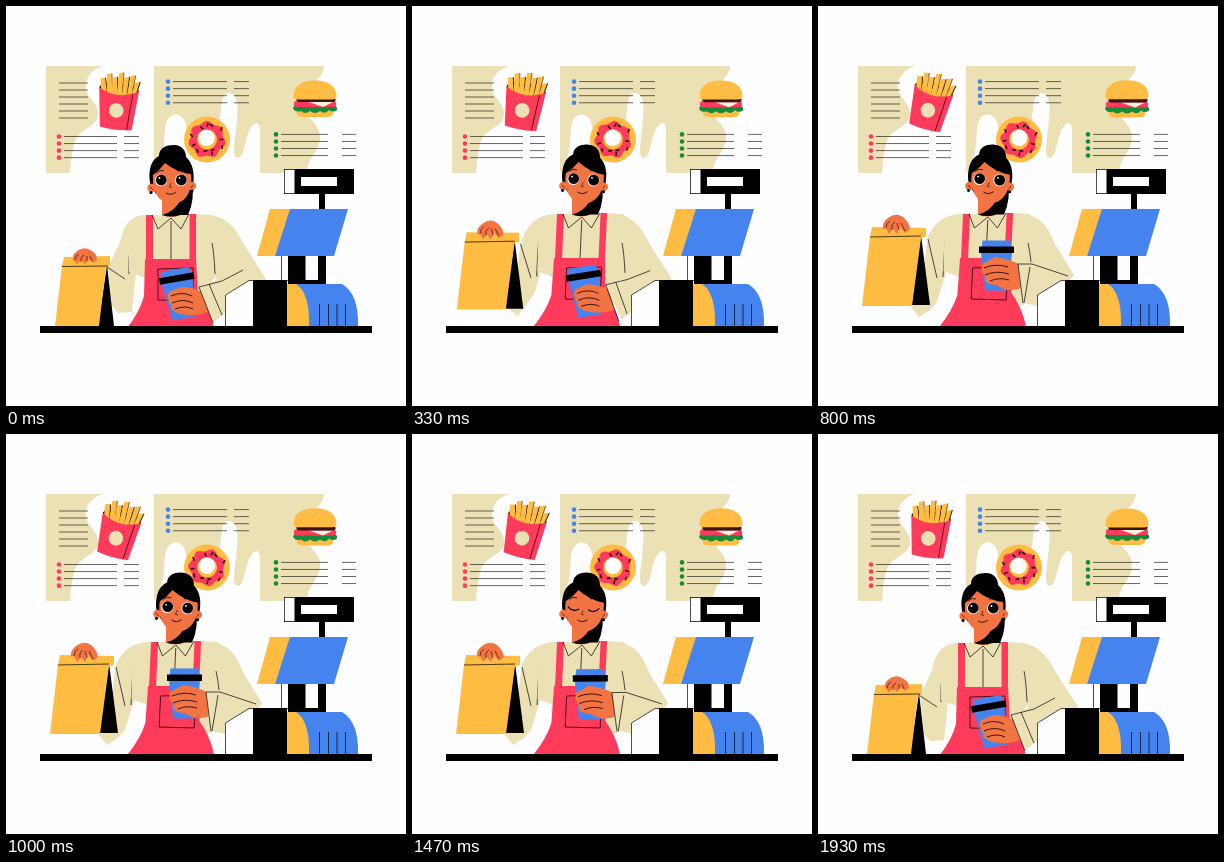
Write an HTML page with a canvas that moves like this. It is 400 px wide and 400 px high and loops after 2 s.

```html
<!DOCTYPE html>
<html>
<head>
<meta charset="utf-8">
<style>
html, body { margin: 0; width: 100%; height: 100%; overflow: hidden; background: #fefdff; }
canvas { display: block; width: 400px; height: 400px; }
</style>
</head>
<body>
<canvas id="stage"></canvas>
<script>
const canvas = document.getElementById('stage');
const ctx = canvas.getContext('2d');
const dpr = window.devicePixelRatio || 1;
canvas.width = canvas.height = 400 * dpr;

const LOOP = 2000;
const BLACK = '#000', WHITE = '#fefdff', BEIGE = '#ece1b5', YELLOW = '#ffbc43', PINK = '#ff3b5c',
  BLUE = '#4583ee', SKIN = '#f37443', GREEN = '#178a3a', CREASE = '#3a1410';

const ramp = (t, a, b) => {
  const x = Math.min(1, Math.max(0, (t - a) / (b - a)));
  return x * x * (3 - 2 * x);
};
const hold = (t, a, b, c, d) => ramp(t, a, b) - ramp(t, c, d);
const mix = (a, b, k) => a + (b - a) * k;

// Blends two path strings that share the same commands.
function morph(from, to, k) {
  const ends = to.match(/-?[\d.]+/g);
  let i = 0;
  return from.replace(/-?[\d.]+/g, n => mix(+n, +ends[i++], k).toFixed(2));
}
function fill(d, color) {
  ctx.fillStyle = color;
  ctx.fill(new Path2D(d));
}
function line(d, width = 0.7, color = BLACK) {
  ctx.strokeStyle = color;
  ctx.lineWidth = width;
  ctx.stroke(new Path2D(d));
}
function dot(x, y, r, color) {
  ctx.fillStyle = color;
  ctx.beginPath();
  ctx.arc(x, y, r, 0, 7);
  ctx.fill();
}
function at(x, y, degrees, draw) {
  ctx.save();
  ctx.translate(x, y);
  ctx.rotate(degrees * Math.PI / 180);
  draw();
  ctx.restore();
}

function rows(x, y, color, x1, x2, x3, x4) {
  for (let i = 0; i < 4; i++, y += 7.05) {
    dot(x, y, 2.3, color);
    line(`M${x + 5} ${y}H${x1}M${x2} ${y}H${x3}`, 0.6);
  }
}

function board() {
  fill('M40 60H97C87 63 79 70 80 83C81 92 92 96 92 108C92 122 73 121 68 138Q65 150 64 167H40Z', BEIGE);
  fill('M148 60H318C318 72 302 78 298 92C292 108 312 114 314 129C315 146 301 150 301 167H254V126C254 113 248 116 244 123C238 135 239 152 231 152C225 149 230 130 231 112C233 96 230 87 223 87C214 87 216 104 213 118L201 133L180 122C180 113 174 107 167 109C156 113 160 130 157 146Q154 158 148 167Z', BEIGE);
  for (let i = 0; i < 6; i++) line(`M53 ${77 + i * 7}H82`, 0.6);
  rows(53, 130.5, PINK, 111, 118, 133);
  rows(162, 75.6, BLUE, 221, 228, 243);
  rows(270, 128.4, GREEN, 322, 336, 350);
}

function fries(k) {
  at(111.5, 102, mix(5, 14, k), () => {
    fill('M-20 -19L-17 -24H16L20 -18L10 -8H-10Z', BLACK);
    [[-17, -28], [-11, -33], [-5, -30], [1, -35], [7, -31], [13, -33], [18, -27]].forEach(([x, y], i) => {
      const foot = x * 0.75;
      fill(`M${x - 2.6} ${y}L${x + 2.4} ${y - 1}L${foot + 3} 0H${foot - 3}Z`, YELLOW);
      line(`M${x + 2.4} ${y - 1}L${foot + 3} -10`, i % 2 ? 0.5 : 0.8);
    });
    fill('M-20 -19Q-10 -13 0 -13Q10 -13 20 -18L16 21Q0 23 -16 20Z', PINK);
    line('M14 -15L11 21', 0.6);
    dot(-1, 2.5, 7.3, BEIGE);
  });
}

function donut(k) {
  at(201, 133.5, 18 * k, () => {
    dot(0, 0, 23, YELLOW);
    ctx.beginPath();
    for (let i = 0; i <= 90; i++) {
      const a = i * Math.PI / 45, r = 17.5 + 1.3 * Math.sin(7 * a);
      ctx.lineTo(r * Math.cos(a), r * Math.sin(a));
    }
    ctx.fillStyle = PINK;
    ctx.fill();
    dot(0, 0, 10, YELLOW);
    dot(-0.5, -1.6, 8.2, WHITE);
    for (let i = 0; i < 12; i++) {
      const a = i * 2.4, r = 12.5 + i % 3 * 2;
      const x = r * Math.cos(a), y = r * Math.sin(a);
      line(`M${x} ${y}l${3.8 * Math.cos(i)} ${3.8 * Math.sin(i)}`, 1.6, '#26080e');
    }
  });
}

function burger(k) {
  at(309, 94 + 0.5 * k, 0, () => {
    fill('M-18 9H18Q20 17 12 17H-12Q-20 17 -18 9Z', YELLOW);
    fill('M-22 8Q-20 4 -16 5H18Q23 6 22 10Q18 13 14 10Q10 15 5 11Q0 15 -5 11Q-10 15 -14 11Q-20 13 -22 8Z', GREEN);
    fill('M-20 1H20Q23 5 19 7H-19Q-23 5 -20 1Z', PINK);
    fill('M-6 2H18L8 7Z', '#fff3dc');
    fill('M-18 -2H20Q22 1 18 2H-16Q-20 1 -18 -2Z', '#3b1512');
    ctx.translate(0, -0.8 * k);
    fill('M-21.5 -3C-22 -14 -13 -19.5 0 -19.5C13 -19.5 22 -14 21.5 -3Q20 -0.5 17 -0.5H-17Q-21 -0.5 -21.5 -3Z', YELLOW);
    line('M-10 -12l1 -1M-3 -15h1M4 -13l1 1M10 -14l1 1M0 -9h1M13 -8l1 1', 0.9, BEIGE);
  });
}

function torso(lean) {
  ctx.save();
  ctx.transform(1, 0, -lean / 22, 1, lean * 320 / 22, -lean);
  fill('M140 209Q128 210 122 220L123 266L139 272L150 300H205L206 275L228 250Q224 222 206 209L190 208Z', BEIGE);
  fill('M140 209H147V253H183.5V208H190V253L192 288Q203 302 208 321H122Q134 305 138 290L139 253H140Z', PINK);
  line('M152 263L187 262V295L152 294Z');
  line('M165 215V253M146 209L152 223L165 212L175 223L183 208', 0.7);
  ctx.restore();
}

function head(lean, blink) {
  ctx.save();
  ctx.translate(4 * lean, -lean * 0.5);
  fill('M156 188H175V209Q165 213 156 209Z', SKIN);
  fill('M156 209Q168 206 174 195L186 174Q189 194 182 209H174Q165 212 156 209Z', BLACK);
  at(168, 208, 4 * lean, () => {
    ctx.translate(-168, -208);
    fill('M144 177C142 164 145 154 153 150C153 142 160 139 168 139C176 139 180 145 180 151C187 157 189 168 187 180L182 188H150Z', BLACK);
    dot(145.5, 182, 4.2, SKIN);
    dot(186, 180, 4.2, SKIN);
    fill('M147 169Q154 164 159 157Q170 166 185 168C187 185 180 197 166 198.5C152 197 146 184 147 169Z', SKIN);
    line('M150 167Q154 163 158 165M171 165Q177 163 181 167', 0.8);
    if (blink) {
      line('M149.5 174Q155 180 161 176M170 176Q176 180 181 174', 1.1);
    } else {
      for (const x of [155, 175]) {
        dot(x, 174.3, 6, WHITE);
        dot(x + 0.3, 174, 5.4, BLACK);
        dot(x - 1.5, 172, 0.9, WHITE);
      }
    }
    line('M165 177L163.5 181L166 181.5', 0.6);
    line('M160 187Q165 190 170 186', 0.8);
    line('M144 181l3 3M187 179l-2 3', 0.6);
    dot(145, 186.5, 1.5, BLACK);
    dot(186, 185, 1.5, BLACK);
  });
  ctx.restore();
}

function bagArm(k) {
  const m = (a, b) => morph(a, b, k);
  fill(m('M141 209Q119 208 114 236L102 262L106 300L112 307L126 306L130 268L141 240Z',
    'M146 208Q121 207 110 230L108 245L104 280L93 301Q101 311 112 304L119 296L125 271L141 240Z'), BEIGE);
  line(m('M101 261L119 273M125 237Q122 252 123 268', 'M110 233L119 272M127 235Q126 252 125 271'));
  fill(m('M101 259L108 320H92Z', 'M103 229L112 299L93 300Z'), BLACK);
  fill(m('M58 251L104 250L104 260L100 261L93 320H49L56 260Z',
    'M54 221L108 222L108 231L103 232L94 300H44L52 231Z'), YELLOW);
  line(m('M56 260.5L102 260', 'M52 231L103 230'));
  fill(m('M68 255Q65 250 70 246Q78 239 86 245Q91 248 91 254L87 257L83 253L79 258L75 254L71 258L68 255Z',
    'M65 223Q64 216 70 212Q78 206 85 211Q91 216 92 223L87 227L82 221L79 228L75 223L71 228L68 222Z'), SKIN);
  line(m('M69 254Q69 250 73 248M75 256Q74 251 78 249M81 255L81 250M86 255L84 250',
    'M68 222Q68 217 72 215M74 224Q73 218 77 216M81 224L79 217M87 225L83 217'), 0.7, CREASE);
}

function cupArm(k, lean) {
  const m = (a, b) => morph(a, b, k);
  at(mix(173.5, 178.5, k), mix(288, 259.5, k), -10 * (1 - k), () => {
    fill('M-14 -25H14L15.5 -13L11.5 25H-11.5L-15.5 -13Z', BLUE);
    fill('M-17.5 -19H17.5V-12.5H-17.5Z', BLACK);
    line('M-13 4Q0 6 13 4', 0.5);
  });
  fill(m('M163 286L175 281Q187 281 196 286L202 306Q190 311 174 308Q164 305 165 299Q160 293 163 286Z',
    'M164 258L177 251Q192 253 203 259L204 282Q190 287 178 279Q165 278 167 271Q162 265 164 258Z'), SKIN);
  line(m('M165 290Q176 285 186 290M166 297Q177 292 187 297M169 303Q179 299 187 303',
    'M166 262Q178 257 190 261M167 269Q178 264 191 268M172 275Q181 271 191 274'), 1, CREASE);
  const shoulder = 205 + 3 * lean;
  fill(m(`M${shoulder} 209C226 213 232 228 239 240L260 273L236 293L207 317L193 281L210 274L205 240Z`,
    `M${shoulder} 209C226 211 232 226 238 240L256 269Q250 277 235 283L220 300L204 297L200 258L210 257L205 240Z`), BEIGE);
  line(m('M193 281L207 317M203 278L216 309M193 281L216 275L237 264',
    'M200 258L205 297M212 261L206 297M200 258L214 258L250 270'));
  const x = 206 + 4 * lean;
  line(`M${x} 237Q${x + 2} 246 ${x + 3} ${mix(268, 256, k)}`);
}

function register() {
  fill('M278 163H348V188H278Z', BLACK);
  fill('M278.7 163.7H288.5V187.3H278.7ZM295 171H331V180H295Z', WHITE);
  fill('M313 188H319V206H313Z', BLACK);
  fill('M275 249H283V275H275Z', WHITE);
  line('M275.5 249V275M247 274.5H283');
  fill('M282 249H320V279H282Z', BLACK);
  fill('M299.5 249H312V274H299.5Z', WHITE);
  fill('M264 203H285L269 250H251Z', YELLOW);
  fill('M284 203H342L328 250H269Z', BLUE);
  fill('M219 320V289L243 274.5H248V320Z', WHITE);
  line('M219.5 320V289L243 274.5H248');
  fill('M247 274H281V320H247Z', BLACK);
  fill('M281 278H294Q306 290 304 320H281Z', YELLOW);
  fill('M290 278H336Q353 288 352 320H303Q304 287 290 278Z', BLUE);
  line('M313.5 298V320M322.5 298V320M331 298V320M339.5 298V320', 0.7);
  fill('M34 320H366V327H34Z', BLACK);
}

function draw(now) {
  const t = now % LOOP;
  const lean = hold(t, 0, 300, 1470, 1720);
  const bag = hold(t, 0, 450, 1500, 1880);
  const cup = hold(t, 240, 720, 1430, 1880);
  const sway = hold(t, 0, 800, 1250, 2000);

  ctx.setTransform(dpr, 0, 0, dpr, 0, 0);
  ctx.fillStyle = WHITE;
  ctx.fillRect(0, 0, 400, 400);
  board();
  fries(sway);
  donut(sway);
  burger(sway);
  bagArm(bag);
  torso(lean);
  head(lean, t > 1380 && t < 1580);
  cupArm(cup, lean);
  register();
}

const start = performance.now();
function tick() {
  draw(performance.now() - start);
  requestAnimationFrame(tick);
}
tick();
</script>
</body>
</html>
```
